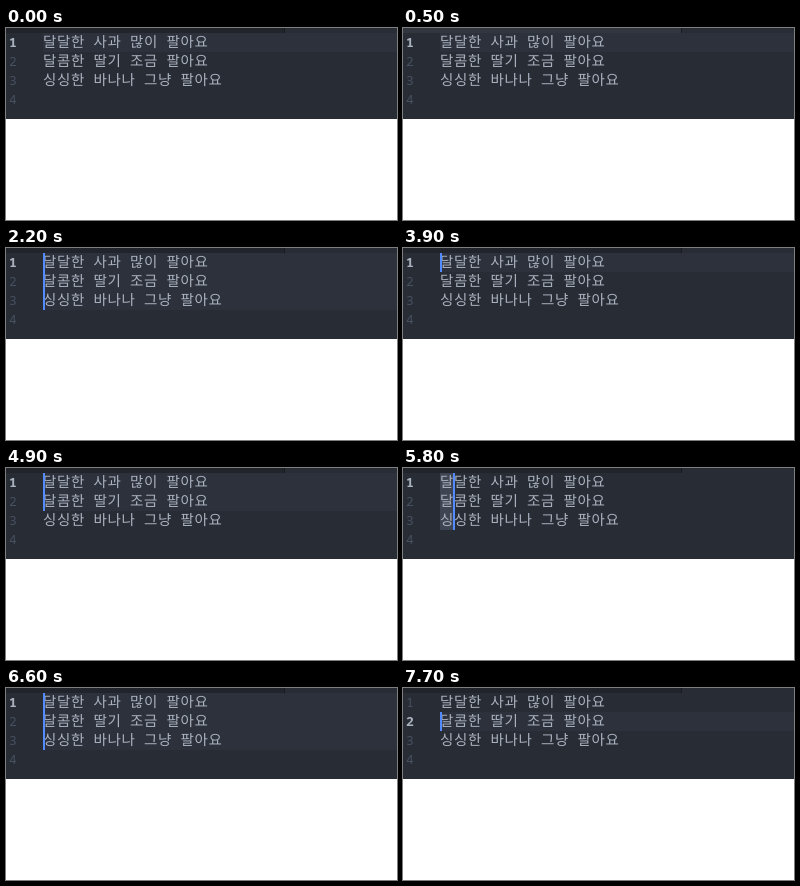
Write an HTML page that moves like this. It is 391 px wide and 192 px high and loops after 8 s.

```html
<!DOCTYPE html>
<html lang="ko">
<head>
<meta charset="utf-8">
<style>
  html, body { margin: 0; width: 100%; height: 100%; overflow: hidden; background: #fff; }
  svg { display: block; }
  .code {
    font: 300 14.5px "Noto Sans CJK KR Light", "Noto Sans CJK KR", "Noto Sans CJK", sans-serif;
    letter-spacing: .66px; word-spacing: 3.79px; white-space: pre;
    text-rendering: geometricPrecision; fill: #abb2bf;
  }
  .num { font: 13px "Noto Sans Mono", monospace; fill: #465060; }
  .num.on { fill: #abb2bf; font-weight: 600; }
  .caret { fill: #528bff; }
  .sel { fill: #3e4451; }
  .line { fill: #2c313c; }
</style>
</head>
<body>
<svg width="391" height="192" viewBox="0 0 391 192">
  <rect width="391" height="91" fill="#282c34"/>
  <rect width="278" height="5" fill="#21252b"/>
  <rect id="tab" width="278" height="5" fill="#31363f"/>
  <rect x="278" width="1" height="5" fill="#181a1f"/>
  <g id="under"></g>
  <g id="text"></g>
  <g id="over"></g>
</svg>
<script>
const LOOP = 8000, TOP = 5, ROW = 19, WIDTH = 391, LEFT = 37, END = 199;
const lines = ["달달한 사과 많이 팔아요", "달콤한 딸기 조금 팔아요", "싱싱한 바나나 그냥 팔아요", ""];
const $ = id => document.getElementById(id);
const all = [1, 2, 3];

// at: start time, rows: rows holding a caret, x: caret column, off: blinked out
const steps = [
  { at: 0, rows: [1], off: true },
  { at: 500, rows: [1], off: true, tab: true },
  { at: 700, rows: [1], off: true },
  { at: 1000, rows: [1] },
  { at: 1400, rows: [1], off: true },
  { at: 1900, rows: [1] },
  { at: 2000, rows: [1, 2] },
  { at: 2200, rows: all },
  { at: 2700, rows: all, off: true },
  { at: 3100, rows: all },
  { at: 3600, rows: [1, 2] },
  { at: 3900, rows: [1] },
  { at: 4300, rows: [2] },
  { at: 4500, rows: [1] },
  { at: 4900, rows: [1, 2] },
  { at: 5100, rows: all },
  { at: 5500, rows: all, off: true },
  { at: 5800, rows: all, x: 50, sel: true },
  { at: 6000, rows: all, x: 64, sel: true },
  { at: 6300, rows: all, x: 78, sel: true },
  { at: 6600, rows: all },
  { at: 6800, rows: all, x: END },
  { at: 7300, rows: [2], extra: [2, 3] },
  { at: 7700, rows: [2] }
];

const rowY = row => TOP + (row - 1) * ROW;
const box = (cls, x, row, w) =>
  `<rect class="${cls}" x="${x}" y="${rowY(row)}" width="${w}" height="${ROW}"/>`;

$("text").innerHTML = lines.map((s, i) => {
  const y = rowY(i + 1) + 14;
  return `<text class="num" x="3" y="${y}">${i + 1}</text>` +
    `<text class="code" x="${LEFT}" y="${y}">${s}</text>`;
}).join("");
const nums = [...document.querySelectorAll(".num")];

function show({ rows, x = LEFT, off, sel, tab, extra = [] }) {
  $("tab").style.display = tab ? "" : "none";
  $("under").innerHTML = rows.map(r =>
    sel ? box("sel", LEFT, r, x + 1 - LEFT) : box("line", LEFT, r, WIDTH - LEFT)).join("");
  $("over").innerHTML = (off ? [] : rows).map(r => box("caret", x, r, 2))
    .concat(extra.map(r => box("caret", END, r, 2))).join("");
  nums.forEach((n, i) => n.classList.toggle("on", i + 1 === rows[0]));
}

let current;
const start = performance.now();
function tick() {
  const t = (performance.now() - start) % LOOP;
  const step = steps.findLast(s => s.at <= t);
  if (step !== current) show(current = step);
  requestAnimationFrame(tick);
}
tick();
</script>
</body>
</html>
```
